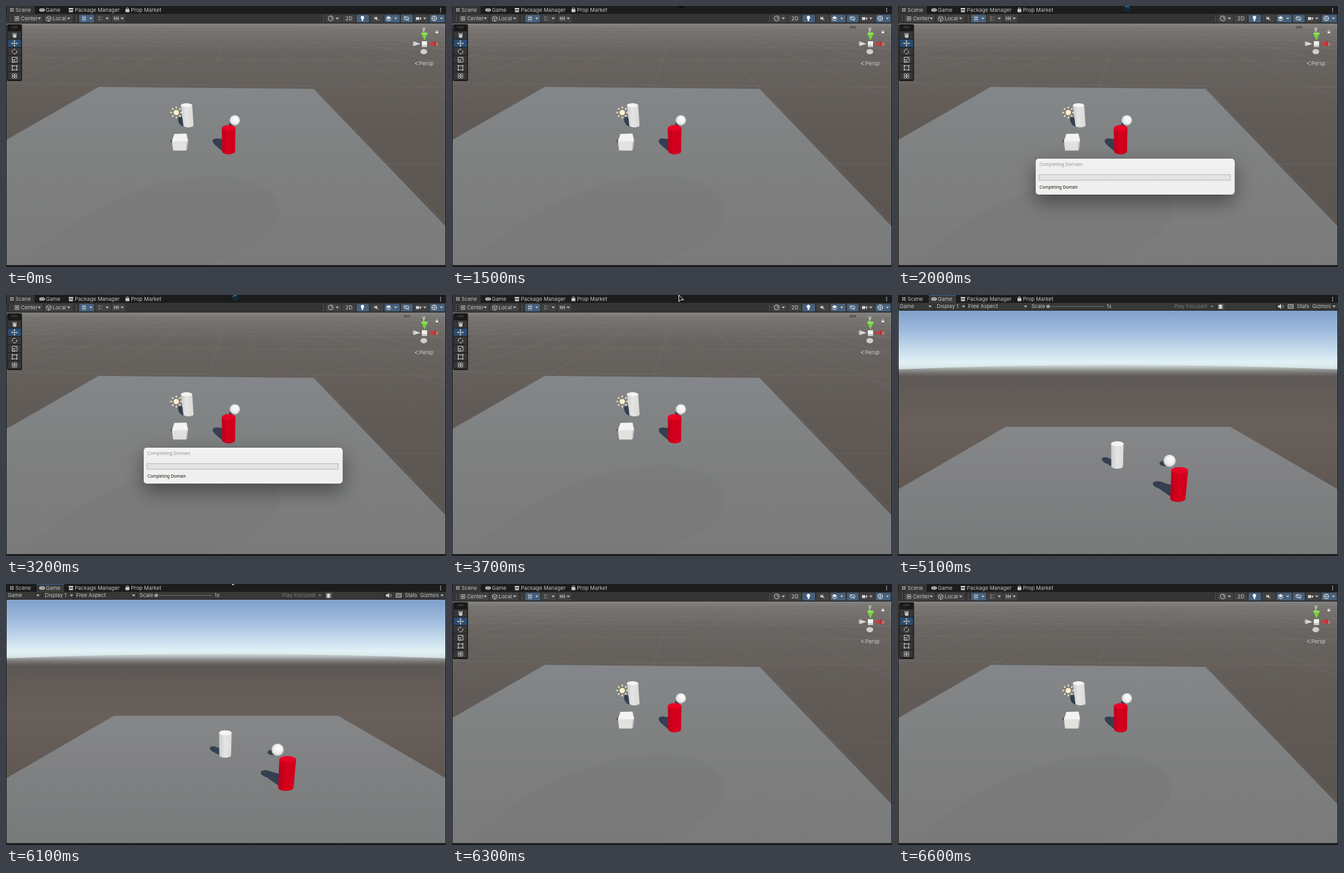
These frames come from a looping animation (674x400 px, 7.7 s). An HTML page with a canvas:

```html
<!DOCTYPE html>
<html lang="en">
<head>
<meta charset="utf-8">
<title>Editor play mode</title>
<style>
html, body { margin: 0; width: 100%; height: 100%; overflow: hidden; background: #191919; }
canvas { display: block; width: 674px; height: 400px; }
</style>
</head>
<body>
<canvas id="stage" width="674" height="400"></canvas>
<script>
const W = 674, H = 400, LOOP = 7700;
const c = document.getElementById('stage').getContext('2d');
const UI = 'Inter, Roboto, sans-serif';
const clamp = v => Math.max(0, Math.min(1, v));
const ramp = (t, a, b) => clamp((t - a) / (b - a));

function rect(x, y, w, h, fill) {
  c.fillStyle = fill;
  c.fillRect(x, y, w, h);
}
function box(x, y, w, h, r, fill) {
  c.beginPath();
  c.roundRect(x, y, w, h, r);
  c.fillStyle = fill;
  c.fill();
}
function path(pts, close) {
  c.beginPath();
  for (let i = 0; i < pts.length; i += 2) c.lineTo(pts[i], pts[i + 1]);
  if (close) c.closePath();
}
function poly(fill, ...pts) {
  path(pts, true);
  c.fillStyle = fill;
  c.fill();
}
function line(color, width, ...pts) {
  path(pts);
  c.strokeStyle = color;
  c.lineWidth = width;
  c.stroke();
}
function oval(x, y, rx, ry, fill, rot = 0) {
  c.beginPath();
  c.ellipse(x, y, rx, ry, rot, 0, 7);
  c.fillStyle = fill;
  c.fill();
}
function ring(x, y, r, color, width = 1, from = 0, to = Math.PI * 2) {
  c.beginPath();
  c.arc(x, y, r, from, to);
  c.strokeStyle = color;
  c.lineWidth = width;
  c.stroke();
}
function text(s, x, y, fill = '#c4c4c4', size = 8, font = UI, weight = 400) {
  c.font = `${weight} ${size}px ${font}`;
  c.fillStyle = fill;
  c.fillText(s, x, y);
}
function fade(x0, y0, x1, y1, ...stops) {
  const g = c.createLinearGradient(x0, y0, x1, y1);
  for (let i = 0; i < stops.length; i += 2) g.addColorStop(stops[i], stops[i + 1]);
  return g;
}
const caret = (x, y) => poly('#c0c0c0', x - 2.5, y - 1.2, x + 2.5, y - 1.2, x, y + 1.8);

// ---- shared solids ----
function cylinder(x0, y0, x1, y1, r0, r1, ry, tones) {
  c.beginPath();
  c.moveTo(x0 - r0, y0);
  c.lineTo(x1 - r1, y1);
  c.ellipse(x1, y1, r1, ry, 0, Math.PI, 0, true);
  c.lineTo(x0 + r0, y0);
  c.closePath();
  c.fillStyle = fade(x0 - r0, 0, x0 + r0, 0, 0, tones[0], 0.45, tones[1], 1, tones[2]);
  c.fill();
  oval(x0, y0, r0, ry, tones[3]);
}
function sphere(x, y, r) {
  const g = c.createRadialGradient(x + r * .2, y - r * .35, r * .2, x, y, r);
  g.addColorStop(0, '#fafafa');
  g.addColorStop(.65, '#ededed');
  g.addColorStop(1, '#bcc0c5');
  oval(x, y, r, r, g);
}
const WHITE = ['#c9cbcd', '#e4e4e3', '#dcdbd8', '#f4f4f3'];
const RED = ['#bd0019', '#d7001d', '#cb001b', '#e80324'];
const SHADE = '#343f50';

// ---- tab strip ----
function tabs(game) {
  rect(0, 0, W, 12, '#1c1c1c');
  if (game) {
    rect(47, 0, 42, 12, '#3a3a3a');
    rect(47, 0, 42, 1, '#2f5f90');
  } else rect(1, 0, 43, 12, '#343434');
  for (const d of [0, 3]) {
    line('#c0c0c0', .8, 6, 4.5 + d, 12, 4.5 + d);
    line('#c0c0c0', .8, 7.5 + d, 3, 7.5 + d, 9);
  }
  text('Scene', 14.5, 9);
  box(51, 3.8, 8.5, 4.8, 2.4, '#c8c8c8');
  rect(53, 5.2, 1.5, 1.5, '#333');
  rect(56, 5.2, 1.5, 1.5, '#333');
  text('Game', 61, 9);
  rect(96, 3, 7, 2, '#c8c8c8');
  rect(96.5, 5.5, 6, 4, '#c8c8c8');
  rect(98, 6, 3, 1, '#333');
  text('Package Manager', 105.5, 9);
  box(183, 4.5, 6, 5, .8, '#c8c8c8');
  ring(186, 4.3, 1.7, '#c8c8c8', .8, Math.PI, 0);
  text('Prop Market', 191.5, 9);
  for (const y of [3, 5.5, 8]) rect(665, y, 1.4, 1.4, '#c8c8c8');
}
function frame() {
  rect(0, 12, 1, H, '#1c1c1c');
  rect(673, 12, 1, H, '#1c1c1c');
  rect(0, 397, W, 3, '#1d1d1d');
}

// ---- scene view ----
function sceneBar() {
  rect(0, 12, W, 15, '#343434');
  const button = (x, w, on) => box(x, 13.5, w, 11.5, 1.5, on ? '#46607c' : '#414141');
  const light = '#d2d2d2';
  line('#555', 1, 6.5, 14, 6.5, 25);
  button(10, 46);
  c.strokeStyle = light;
  c.lineWidth = .8;
  c.strokeRect(14, 16.5, 5.5, 5.5);
  oval(16.8, 19.3, 1.2, 1.2, light);
  text('Center', 23, 22);
  caret(51, 19);
  button(59, 43);
  line(light, .8, 62, 17.5, 65.5, 15.5, 69, 17.5, 69, 21.5, 65.5, 23.5, 62, 21.5, 62, 17.5, 65.5, 19.5, 69, 17.5);
  line(light, .8, 65.5, 19.5, 65.5, 23.5);
  text('Local', 71.5, 22);
  caret(96, 19);
  line('#555', 1, 107.5, 14, 107.5, 25);
  button(112, 23, true);
  for (const d of [0, 3]) {
    line(light, .8, 116, 17.5 + d, 123, 17.5 + d);
    line(light, .8, 118 + d, 15, 118 + d, 23.5);
  }
  caret(130, 19);
  button(137, 23);
  for (const d of [0, 4]) line('#858585', .8, 141, 17 + d, 148, 17 + d);
  line('#a06a5c', 1, 142.5, 15, 142.5, 23);
  caret(155, 19);
  button(162, 21);
  for (const x of [166, 169, 172]) line('#c8c8c8', .9, x, 16, x, 22);
  line('#c8c8c8', .8, 165, 19, 173, 19);
  caret(178, 19);

  line('#555', 1, 486.5, 14, 486.5, 25);
  button(490, 23);
  ring(497.5, 19, 3.8, light, .9);
  oval(499, 18, 1.8, 2.3, '#777');
  caret(507.5, 19);
  button(515, 20);
  text('2D', 520, 22, light);
  button(537, 19, true);
  oval(546, 17.8, 2.5, 2.7, '#fff');
  rect(544.8, 20, 2.4, 3, '#fff');
  button(558, 20);
  poly(light, 564, 18, 566, 18, 568.5, 16, 568.5, 22, 566, 20, 564, 20);
  line(light, .7, 564, 16, 571, 22);
  button(580, 23, true);
  poly('#eee', 582, 18, 586, 15.5, 590, 18, 586, 20.5);
  line('#eee', 1, 582, 20.3, 586, 22.7, 590, 20.3);
  caret(597, 19);
  button(605, 18, true);
  c.beginPath();
  c.ellipse(613.5, 19, 4, 2.4, 0, 0, 7);
  c.strokeStyle = '#eee';
  c.lineWidth = .9;
  c.stroke();
  line('#eee', 1, 610, 16, 617, 22.5);
  button(625, 22);
  rect(628, 17, 5, 4.5, light);
  poly(light, 633, 19, 636, 17, 636, 21.5);
  caret(641.5, 19);
  button(649, 23, true);
  ring(656, 19, 3.7, '#eee', .9);
  line('#eee', .7, 652, 19, 660, 19);
  line('#eee', .7, 656, 15, 656, 23);
  caret(667, 19);
}
function toolPanel() {
  box(1.5, 28, 23, 87, 2, '#191919');
  line('#4b4b4b', .8, 8, 31.5, 18, 31.5);
  line('#4b4b4b', .8, 8, 33.5, 18, 33.5);
  for (let i = 0; i < 6; i++) rect(3, 38.8 + i * 12.5, 20, 11.6, i === 1 ? '#2c4d72' : '#373737');
  const k = '#c8c8c8';
  box(10.5, 44, 5.5, 4.7, 1.8, k);
  for (let i = 0; i < 4; i++) line(k, 1, 11 + i * 1.45, 45, 10.4 + i * 1.8, 41.5);
  line(k, 1, 8.5, 57.3, 17.5, 57.3);
  line(k, 1, 13, 52.8, 13, 61.8);
  for (const s of [-1, 1]) {
    poly(k, 13 + s * 5, 57.3, 13 + s * 3, 55.7, 13 + s * 3, 58.9);
    poly(k, 13, 57.3 + s * 5, 11.4, 57.3 + s * 3, 14.6, 57.3 + s * 3);
  }
  ring(13, 69.8, 3.6, k, 1, -.4, 2.1);
  ring(13, 69.8, 3.6, k, 1, 2.7, 5.2);
  c.strokeStyle = k;
  c.lineWidth = .9;
  c.strokeRect(9.5, 78.5, 7.5, 7.5);
  c.strokeRect(9.5, 82.5, 3.5, 3.5);
  line(k, .9, 13.5, 81.8, 16, 79.5);
  c.strokeRect(9.7, 91.7, 6.8, 6.2);
  for (const x of [9.7, 16.5]) for (const y of [91.7, 97.9]) oval(x, y, 1.1, 1.1, k);
  for (const [x, y] of [[11, 105.5], [15, 105.5], [11, 109], [15, 109]]) ring(x, y, 1.8, k, .9);
}
function axes() {
  poly('#dadada', 624, 54, 624, 61.5, 635, 58);
  oval(624.5, 57.7, 1.3, 3.8, '#bdbdbd');
  poly('#c83e3e', 657.5, 53.5, 657.5, 62, 646, 58);
  oval(657, 57.7, 1.4, 4.2, '#b23434');
  poly('#72d13b', 636, 42, 646, 42, 641, 53);
  oval(641, 42, 5, 1.6, '#96e661');
  rect(637, 54, 8, 8, '#f0f0f0');
  rect(637, 60, 8, 3, '#c7c7c7');
  oval(640, 70, 5.2, 4, '#cecece');
  text('y', 637.8, 38, '#cfeebb', 8, UI, 700);
  text('x', 658.3, 60.5, '#ea7a78', 7.5, UI, 700);
  rect(658, 39, 4, 3, '#ddd');
  ring(660, 38.6, 1.4, '#ddd', .7, Math.PI, 0);
  line('#d0d0d0', .8, 631.5, 85.5, 626.5, 88, 631.5, 90.5);
  text('Persp', 633, 91, '#d0d0d0');
}
function grid() {
  const vx = 352, vy = 3;
  c.save();
  c.beginPath();
  c.rect(1, 28, 672, 369);
  c.clip();
  for (let i = -24; i <= 24; i++) {
    const a = i % 2 ? .1 : .22;
    line(fade(0, 28, 0, 130, 0, 'rgba(160,157,154,0)', .35, `rgba(160,157,154,${a})`), .7,
      vx, vy, vx + (i * 82 - 45) * 4, vy + 122 * 4);
  }
  for (let z = 5; z < 50; z += 2.5) {
    const y = vy + 1184 / z;
    line(`rgba(160,157,154,${z % 5 ? .08 : .2})`, .7, 0, y - 3, W, y + 3);
  }
  c.restore();
}
function scene(handle) {
  rect(0, 27, W, 370, fade(0, 27, 0, 397, 0, '#858483', .02, '#777370', .12, '#696460', .4, '#615b57', 1, '#59534f'));
  grid();
  poly(fade(0, 124, 0, 397, 0, '#84878a', .3, '#808283', .65, '#7d7e7e', 1, '#7b7b7b'),
    142, 124, 471, 127, 674, 338, 674, 397, 1, 397, 1, 205);
  // faint tonal band in the foreground
  c.beginPath();
  c.moveTo(28, 397);
  c.bezierCurveTo(90, 330, 190, 266, 320, 260);
  c.bezierCurveTo(400, 262, 440, 300, 408, 340);
  c.bezierCurveTo(385, 365, 350, 380, 310, 397);
  c.fillStyle = 'rgba(104,104,104,.14)';
  c.fill();

  oval(269, 177, 4.5, 8, SHADE, -.5);
  cylinder(276.5, 152, 279.5, 183, 8.7, 7.8, 3, WHITE);
  sun(260.8, 163.3);
  poly(SHADE, 251.5, 206, 257, 205, 258, 216);
  poly('#e2e2df', 254, 207, 277, 207, 276, 221.5, 256, 221.5);
  poly('#c8c9c8', 277, 207, 279, 206, 277.5, 219, 276, 221.5);
  poly('#f3f3f2', 258, 196, 276.5, 195.5, 279, 207, 254, 207.5);
  oval(346, 181, 4.5, 2.5, SHADE);
  sphere(350.5, 175.2, 8);
  oval(324, 209, 8, 5, SHADE, .5);
  poly(SHADE, 322, 203, 332, 204, 332, 223, 320, 213);
  cylinder(341, 187, 341, 223, 10.5, 9.8, 4.4, RED);

  if (handle) {
    line('#3f3c3a', .9, 609, 31.5, 619, 31.5);
    line('#3f3c3a', .9, 609, 33.5, 619, 33.5);
  }
  axes();
  frame();
  sceneBar();
  toolPanel();
  tabs(false);
}
function sun(x, y) {
  for (let i = 0; i < 8; i++) {
    const a = i * Math.PI / 4, u = Math.cos(a), v = Math.sin(a);
    line('#fff1cf', 1.8, x + u * 6.3, y + v * 6.3, x + u * 9, y + v * 9);
  }
  oval(x, y, 5, 5, '#7b6e55');
  oval(x, y, 4.1, 4.1, '#fff1cf');
}

// ---- game view ----
function gameBar() {
  rect(0, 12, W, 12, '#383838');
  rect(0, 23, W, 1, '#242424');
  const label = (s, x, at) => {
    text(s, x, 20.3);
    if (at) caret(at, 17.5);
  };
  label('Game', 2.5, 49);
  label('Display 1', 59.5, 100.5);
  label('Free Aspect', 107.5, 195.5);
  label('Scale', 204.5);
  line('#686868', 1, 230, 17.5, 316, 17.5);
  oval(230, 17.5, 2.8, 2.8, '#999');
  label('1x', 319.5);
  for (const x of [55.5, 104.5, 200.5, 487.5, 579.5]) line('#262626', 1, x, 13, x, 23);
  text('Play Focused', 423, 20.3, '#777');
  poly('#777', 478.5, 16.3, 483.5, 16.3, 481, 19.3);
  rect(489, 12.5, 11, 10.5, '#4b4b4b');
  oval(494, 17.8, 2.3, 3.4, '#d8d8d8');
  for (const y of [15.5, 18, 20.5]) line('#d8d8d8', .8, 490.5, y, 497.5, y);
  poly('#d0d0d0', 582, 16, 584, 16, 587, 13.8, 587, 21.2, 584, 19, 582, 19);
  ring(587, 17.5, 3, '#d0d0d0', .9, -.9, .9);
  c.strokeStyle = '#d0d0d0';
  c.lineWidth = .8;
  c.strokeRect(597.5, 14.5, 8, 6);
  for (const y of [16.3, 18.5]) line('#d0d0d0', .8, 598.5, y, 605, y);
  label('Stats', 611);
  label('Gizmos', 634.5, 668);
}
function game(t) {
  const drop = 1.3 * ramp(t, 4050, 4400) ** 2;
  rect(0, 24, W, 106, fade(0, 24, 0, 128, 0, '#7f9fca', .3, '#9fbbdd', .55, '#c2d8ea', .76, '#e1f1f6', .84, '#d8e5e7', 1, '#898581'));
  // curved, hazy horizon
  c.beginPath();
  c.moveTo(0, 397);
  c.lineTo(0, 114);
  c.quadraticCurveTo(337, 100, W, 114);
  c.lineTo(W, 397);
  c.fillStyle = fade(0, 105, 0, 397, 0, 'rgba(104,100,97,0)', .035, 'rgba(98,93,90,.55)', .07, '#5d5855', .15, '#625b57', .33, '#69605b', 1, '#574f4a');
  c.fill();
  poly(fade(0, 202, 0, 397, 0, '#858789', .4, '#808183', 1, '#797a7b'),
    165, 202, 509, 202, 674, 298, 674, 397, 0, 397, 0, 298);

  oval(319, 253, 7, 4, SHADE, .25);
  poly(SHADE, 319, 249, 328, 252, 328, 263, 315, 256);
  cylinder(336, 228, 335.7, 262.5, 9.6, 9, 3.8, WHITE);
  if (t < 4100) {
    poly(SHADE, 357, 268, 367, 267, 368, 282, 359, 274);
    poly('#e1e0dd', 367, 264, 389, 264, 388, 285, 367.5, 285);
    poly('#f3f3f2', 366, 257, 387, 257, 389, 264.5, 367, 264.5);
    line('#cfcfcd', 1, 366, 257, 367, 284);
  }
  oval(409, 258, 8.5, 4.3, SHADE);
  sphere(416, 254, 9.5);
  oval(401, 291, 11, 5.2, SHADE, .22);
  poly(SHADE, 399, 286, 419, 291, 419, 310, 396, 294);
  cylinder(431.5, 267.5 + drop, 428.7, 311 + drop, 12.8, 11.7, 5, RED);
  frame();
  gameBar();
  tabs(true);
}

// ---- progress window ----
function dialog(alpha) {
  if (!alpha) return;
  c.save();
  c.globalAlpha = alpha;
  c.shadowColor = 'rgba(0,0,0,.42)';
  c.shadowBlur = 30;
  c.shadowOffsetY = 11;
  box(211, 234, 304.5, 55, 5, '#ececec');
  c.shadowColor = 'transparent';
  box(211, 234, 304.5, 55, 5, fade(0, 234, 0, 289, 0, '#f3f3f3', .3, '#eeeeee', 1, '#f0f0f0'));
  text('Completing Domain', 216.5, 245.3, '#8c8c8c', 7.1, '"Open Sans", "Noto Sans", sans-serif');
  rect(215.5, 258, 294, 9.5, '#b9b9b9');
  rect(216.5, 259, 292, 7.5, '#e3e3e3');
  text('Completing Domain', 217, 280, '#151505', 6.2, '"Noto Sans", "Open Sans", sans-serif');
  c.restore();
}

// ---- pointer ----
function arrow(x, y) {
  path([x, y, x, y + 10, x + 2.8, y + 7.6, x + 7.2, y + 7.3], true);
  c.fillStyle = '#111';
  c.fill();
  c.strokeStyle = '#e8e8e8';
  c.lineWidth = 1;
  c.lineJoin = 'round';
  c.stroke();
}
function pointer(t) {
  if (t >= 1000 && t < 1400) arrow(347.5, t < 1200 ? -.5 : .5);
  else if (t >= 1400 && t < 1700) poly('#0d0d0d', 346, 0, 356, 0, 351, 4.5);
  else if (t >= 1700 && t < 3500) {
    oval(351.3, 4.2, 4.8, 4.8, '#0d2c38');
    const a = t / 1000 * 5;
    ring(351.3, 4.2, 3.7, '#2b7c9a', 1.5, a, a + 1.8);
  } else if (t >= 3500 && t < 5100) arrow(347.5, 0);
  else if (t >= 5800 && t < 6300) poly('#e0e0e0', 346, 0, 350, 0, 347.5, 2.2);
}

function draw(now) {
  const t = now % LOOP;
  if (t >= 3900 && t < 6300) game(t);
  else scene(t >= 1400 && t < 3900);
  dialog(ramp(t, 1650, 1900) * (1 - ramp(t, 3400, 3600)));
  pointer(t);
}
const start = performance.now();
function tick() {
  draw(performance.now() - start);
  requestAnimationFrame(tick);
}
tick();
</script>
</body>
</html>
```
